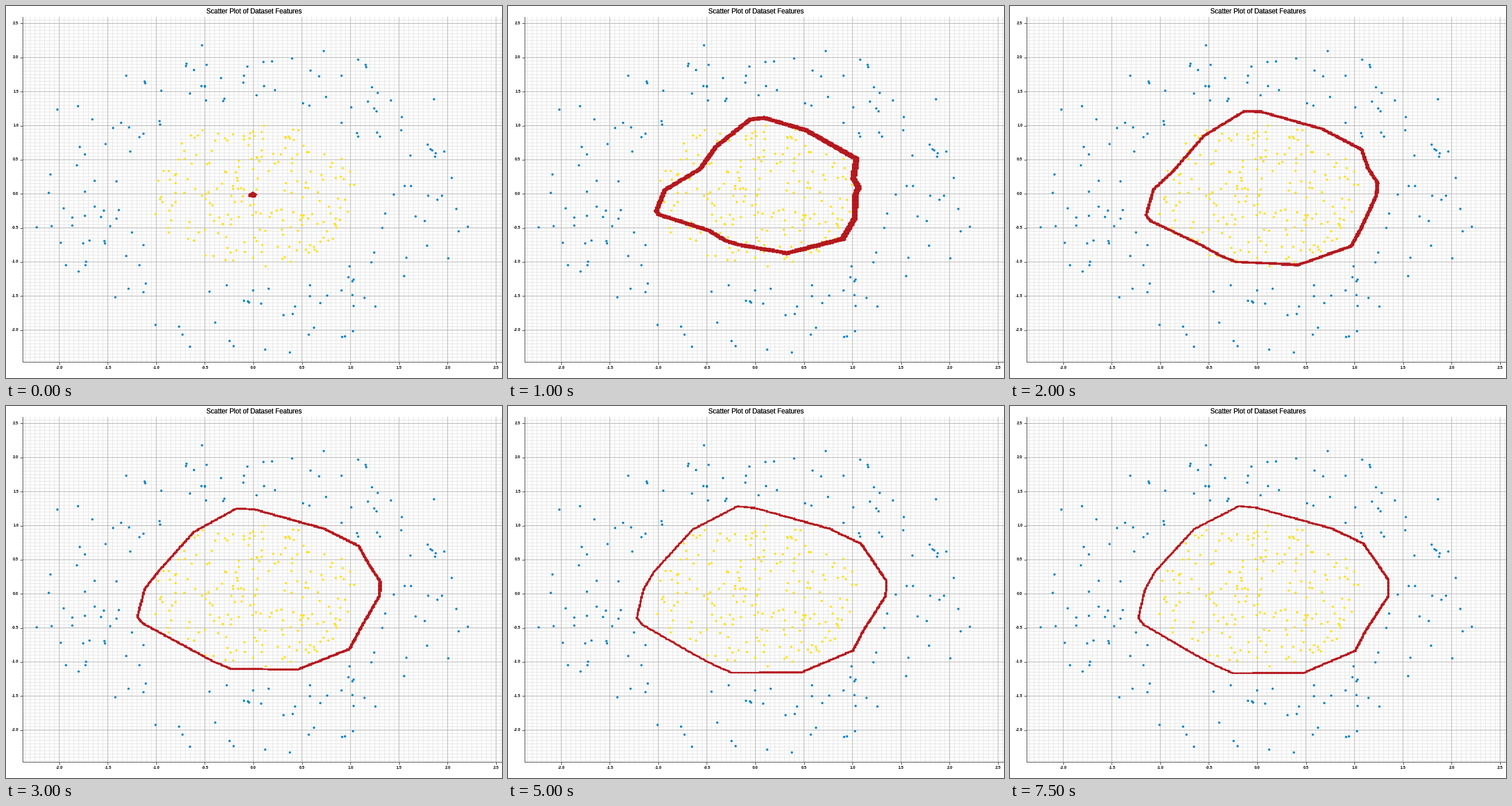
A matplotlib script for the animation above (8 s loop, 864 by 648 pixels).

```python
import numpy as np
import matplotlib.pyplot as plt
from matplotlib.animation import FuncAnimation

W, H, DPI = 864, 648, 100
PX = 72 / DPI
ORIGIN, SCALE = np.array([431, 327.2]), np.array([169.1, -118.7])
LEFT, TOP, BOTTOM = 28.5, 19, 619.5
BLUE, YELLOW, RED = "#0082c8", "#ffe119", "#b4161b"

fig = plt.figure(figsize=(W / DPI, H / DPI), dpi=DPI, facecolor="white")
ax = fig.add_axes([0, 0, 1, 1])
ax.set(xlim=(0, W), ylim=(H, 0))
ax.axis("off")


def to_px(p):
    return np.asarray(p) * SCALE + ORIGIN


def to_data(p):
    return (np.asarray(p) - ORIGIN) / SCALE


def draw_grid():
    k = np.arange(-60, 60)
    for major, color in ((False, "#e4e4e4"), (True, "#adadad")):
        ticks = k[(k % 10 == 0) == major] * 0.05
        xs, ys = to_px(np.column_stack([ticks, ticks])).T
        xs = xs[(xs > LEFT) & (xs < W)]
        ys = ys[(ys > TOP) & (ys < BOTTOM)]
        style = dict(color=color, lw=PX, zorder=1 + major * 0.1, snap=False)
        ax.vlines(xs, TOP, BOTTOM, **style)
        ax.hlines(ys, LEFT, W, **style)


def draw_labels():
    line = dict(color="#444444", lw=PX, zorder=2)
    font = dict(family="Liberation Sans", va="center", color="black")
    small = dict(font, size=7 * PX, weight="bold")
    ax.plot([LEFT, LEFT, W], [TOP, BOTTOM, BOTTOM], **line)
    for v in np.arange(-2, 2.6, 0.5):
        x, y = to_px((v, v))
        ax.plot([x, x], [BOTTOM, BOTTOM + 4], **line)
        ax.plot([LEFT - 4, LEFT], [y, y], **line)
        ax.text(x, 630, f"{v:.1f}", ha="center", **small)
        ax.text(22, y, f"{v:.1f}", ha="right", **small)
    for dx in (0, 0.35):
        ax.text(432.2 + dx, 9.8, "Scatter Plot of Dataset Features",
                ha="center", size=11.6 * PX, **font)


def dots(pts, color, size, z):
    return ax.plot(*np.transpose(pts), "o", color=color, ms=size * PX, mew=0, zorder=z)[0]


def outer_ring(n, rng):
    """Ring of points, sparse towards the lower left."""
    a = rng.uniform(-np.pi, np.pi, 2 * n)
    keep = rng.random(2 * n) > 0.85 * np.exp(-((a + 2.3) / 0.25) ** 2)
    a = a[keep][:n]
    r = rng.uniform(1.33, 2.38, n)
    return to_px(np.column_stack([r * np.cos(a), r * np.sin(a)]))


def inner_disc(n, rng):
    a = rng.uniform(-np.pi, np.pi, n)
    r = 1.08 * rng.random(n) ** 0.55
    return to_px(np.column_stack([r * np.cos(a), r * np.sin(a)]))


# Corners of the decision boundary in pixels, early and fully trained
EARLY = np.array([
    (256, 357), (271, 320), (333, 283), (362, 243), (421, 196), (446, 193),
    (520, 215), (608, 265), (603, 300), (612, 315), (606, 330), (605, 370),
    (584, 406), (486, 431), (400, 416), (378, 409), (348, 391), (260, 363)])
TRAINED = np.array([
    (223, 369), (235, 318), (252, 288), (320, 214), (398, 174), (430, 177),
    (560, 213), (615, 239), (637, 270), (659, 303), (659, 330), (618, 393),
    (601, 426), (512, 464), (388, 465), (358, 452), (322, 433), (233, 381)])
CENTRE = np.array([428, 329])

gx, gy = np.meshgrid(np.arange(-1.3, 1.43, 0.01), np.arange(-1.26, 1.35, 0.01))
GRID = np.column_stack([gx.ravel(), gy.ravel()])


def distance(poly):
    best = np.full(len(GRID), np.inf)
    for a, b in zip(poly, np.roll(poly, -1, axis=0)):
        d = b - a
        u = np.clip((GRID - a) @ d / (d @ d), 0, 1)
        best = np.minimum(best, np.hypot(*(GRID - a - u[:, None] * d).T))
    return best


def band(t):
    """Grid cells near the boundary after t seconds of training."""
    opened = 1 - 0.97 * np.exp(-4.6 * t)
    poly = TRAINED + (EARLY - TRAINED) * np.exp(-0.9 * (t - 1))
    poly = CENTRE + (poly - CENTRE) * opened
    half = (0.0075 + 0.0145 * np.exp(-1.1 * (t - 1))) * opened ** 0.3
    half = half * (1 + 0.3 * np.clip(GRID[:, 0], 0, 1))
    return to_px(GRID[distance(to_data(poly)) < half])


draw_grid()
draw_labels()
rng = np.random.default_rng(11)
dots(outer_ring(165, rng), BLUE, 4, 3)
dots(inner_disc(215, rng), YELLOW, 4, 3)
edge = dots(band(0), RED, 2.8, 4)


def update(i):
    edge.set_data(*band(i * 0.5).T)
    return (edge,)


anim = FuncAnimation(fig, update, frames=16, interval=500, repeat=True, repeat_delay=0)
plt.show()
```
